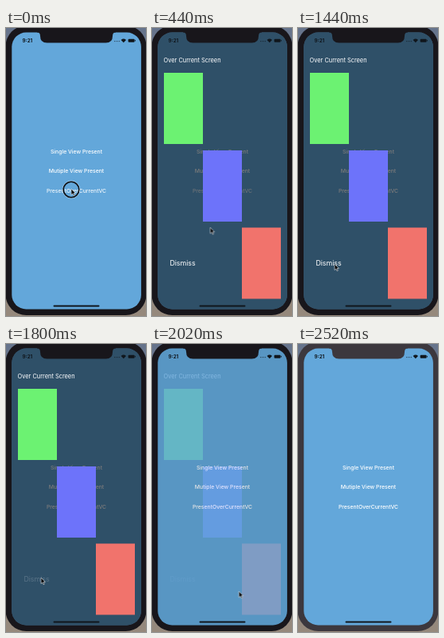
Animation, 176 px wide and 360 px high, one loop 2.59 s. Source, as an HTML page:

```html
<!DOCTYPE html>
<html lang="en">
<head>
<meta charset="utf-8">
<title>Present over current screen</title>
<style>
  html, body { margin: 0; width: 100%; height: 100%; overflow: hidden; background: #7d7d80; }
  svg { display: block; width: 176px; height: 360px; }
  text { font-family: Inter, "Open Sans", sans-serif; fill: #fff; }
  .menu { font-size: 6.85px; font-weight: 500; text-anchor: middle; }
  .title { font-size: 7.4px; }
  .dismiss { font-size: 8.8px; }
  .clock { font-size: 6.2px; font-weight: 700; fill: #10161c; }

  .body, .sheet, .item, .dismiss, .cursor, .ring { animation: 2590ms linear infinite; }
  .body { fill: #18161b; animation-name: body; }
  .sheet { animation-name: sheet; }
  .item { animation-name: item; }
  .dismiss { animation-name: dismiss; }
  .cursor { animation-name: cursor; }
  .ring { animation-name: ring; }

  @keyframes body {
    0%, 91.9% { fill: #18161b; }
    97%, 100% { fill: #3c383e; }
  }
  @keyframes sheet {
    0%, 2% { opacity: 0; animation-timing-function: ease-in-out; }
    17% { opacity: 1; }
    75.1% { opacity: 1; animation-timing-function: step-end; }
    75.2% { opacity: .55; }
    78% { opacity: .2; }
    83%, 100% { opacity: 0; }
  }
  @keyframes item {
    0% { opacity: .9; }
    2.7%, 11.2% { opacity: .3; }
    19.5%, 100% { opacity: 1; }
  }
  @keyframes dismiss {
    0%, 62% { opacity: 1; }
    65%, 100% { opacity: .2; }
  }
  @keyframes cursor {
    0%, 5.4% { transform: translate(82px, 201px); }
    11.2% { transform: translate(81px, 229px); }
    22.4% { transform: translate(66px, 268px); }
    30.5% { transform: translate(60px, 279px); }
    44.4%, 61% { transform: translate(46px, 295px); }
    66%, 75.1% { transform: translate(44px, 292px); }
    78% { transform: translate(109px, 309px); }
    86%, 100% { transform: translate(184px, 345px); }
  }
  @keyframes ring {
    0%, 4% { opacity: 1; }
    6.5%, 61% { opacity: 0; }
    62%, 65% { opacity: 1; }
    67%, 100% { opacity: 0; }
  }
</style>
</head>
<body>
<svg viewBox="0 0 176 360">
  <defs>
    <clipPath id="screen"><rect x="7.3" y="5.6" width="162.6" height="345.8" rx="18"/></clipPath>
    <linearGradient id="desk" x2="0" y2="1">
      <stop stop-color="#66748c"/>
      <stop offset="1" stop-color="#96897c"/>
    </linearGradient>
  </defs>

  <rect width="176" height="360" fill="url(#desk)"/>
  <rect class="body" x="-.5" y="-3" width="177" height="362" rx="26"/>

  <g clip-path="url(#screen)">
    <rect width="176" height="360" fill="#63a7da"/>
    <g class="menu">
      <text x="88.5" y="156.8">Single View Present</text>
      <text x="88.5" y="181.4">Mutiple View Present</text>
      <text class="item" x="88.5" y="206">PresentOverCurrentVC</text>
    </g>

    <g class="sheet">
      <rect width="176" height="360" opacity=".52"/>
      <text class="title" x="14.6" y="42.8">Over Current Screen</text>
      <rect x="15" y="56" width="49" height="89" fill="#6cf272"/>
      <rect x="64" y="153" width="49" height="89" fill="#6d73fa"/>
      <rect x="113" y="249.5" width="49" height="89" fill="#f1736c"/>
      <text class="dismiss" x="22.4" y="297.4">Dismiss</text>
    </g>

    <text class="clock" x="20.6" y="18.2">9:21</text>
    <g fill="#10161c">
      <path d="M136 16.6h7" fill="none" stroke="#10161c" stroke-width="1" stroke-dasharray="1 1" opacity=".7"/>
      <path d="M144.6 14.9Q147.8 12 151 14.9L147.8 18.3Z"/>
      <rect x="153.6" y="13.7" width="8" height="4" rx="1"/>
      <rect x="162" y="14.9" width=".8" height="1.6"/>
      <rect x="59.5" y="346.4" width="58" height="2" rx="1"/>
    </g>
  </g>

  <path class="body" d="M39 4H138V5.6Q134 5.6 134 10Q134 18.6 125.5 18.6H51.5Q43 18.6 43 10Q43 5.6 39 5.6Z"/>

  <g class="cursor">
    <g class="ring" fill="none">
      <circle cy="1" r="11" stroke="#fff" stroke-opacity=".35"/>
      <circle cy="1" r="9.8" stroke="#101216" stroke-width="1.6"/>
    </g>
    <path d="M0 0V7.6L1.8 6 3 8.8 4.3 8.2 3.1 5.6H5.4Z" fill="#08090b" stroke="#e8edf2" stroke-width=".6"/>
  </g>
</svg>
</body>
</html>
```
